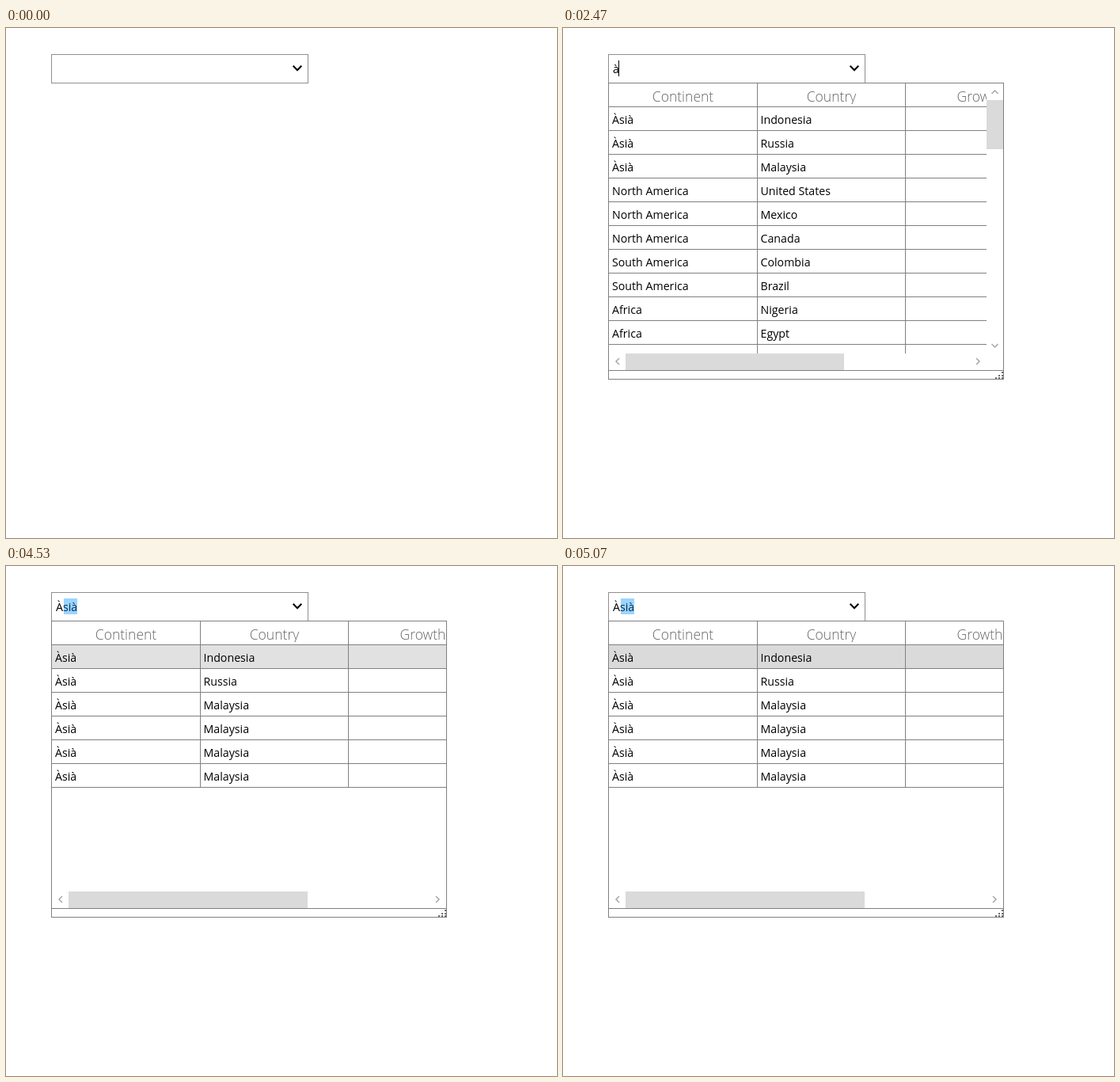
These frames come from a looping animation (696x644 px, 5140 ms). An HTML page:

```html
<!DOCTYPE html>
<html lang="en">
<head>
<meta charset="utf-8">
<style>
  html, body { margin: 0; width: 100%; height: 100%; overflow: hidden; background: #fff; }
  svg { display: block; }
  text { font: 14.2px "Open Sans", "Noto Sans", sans-serif; }
  .head { font-size: 17.5px; font-weight: 300; fill: #666; text-anchor: middle; }
  rect { shape-rendering: crispEdges; }
  path { fill: none; }
</style>
</head>
<body>
<svg id="stage" width="696" height="644" viewBox="0 0 696 644"></svg>
<script>
const LOOP = 5140, OPEN = 2470, FILTER = 3000;
const LINE = '#808080', THUMB = '#dadada', HOVER = '#e2e1e1';
const ALL = [
  ['Àsià', 'Indonesia'], ['Àsià', 'Russia'], ['Àsià', 'Malaysia'],
  ['North America', 'United States'], ['North America', 'Mexico'], ['North America', 'Canada'],
  ['South America', 'Colombia'], ['South America', 'Brazil'],
  ['Africa', 'Nigeria'], ['Africa', 'Egypt'], ['Europe', 'Germany']
];
const ASIA = ['Indonesia', 'Russia', ...Array(4).fill('Malaysia')].map(name => ['Àsià', name]);

const rect = (x, y, w, h, fill, id = '') =>
  `<rect ${id && `id="${id}"`} x="${x}" y="${y}" width="${w}" height="${h}" fill="${fill}"/>`;
const text = (x, y, s, cls = '') => `<text x="${x}" y="${y}" class="${cls}">${s}</text>`;
const path = (d, color, width) => `<path d="${d}" stroke="${color}" stroke-width="${width}"/>`;
const box = (x, y, w, h, color) =>
  rect(x, y, w, h, color) + rect(x + 1, y + 1, w - 2, h - 2, '#fff');
const clip = (id, w, h) => `<clipPath id="${id}"><rect x="58" y="70" width="${w}" height="${h}"/></clipPath>`;

// Scrollbar arrow pointing along (dx, dy)
function arrow(x, y, dx, dy) {
  const bx = x - 2 * dx, by = y - 2 * dy;
  return path(`M${bx - 4 * dy} ${by - 4 * dx}L${x + 2 * dx} ${y + 2 * dy}L${bx + 4 * dy} ${by + 4 * dx}`, '#a6a6a6', 1.5);
}

function grip() {
  let dots = '';
  for (let r = 0; r < 3; r++)
    for (let c = 0; c <= r; c++) dots += rect(554 - 4 * c, 434 + 4 * r - (r > 1), 2, 2, '#6e6e6e');
  return dots;
}

function popup(id, rows, right, thumbWidth, marks = '') {
  const bottom = Math.min(411, 100 + rows.length * 30);
  const heads = ['Continent', 'Country', 'Growth']
    .map((s, i) => text(151.5 + 187.5 * i, 93, s, 'head')).join('');
  const body = rows.map(([a, b], i) => {
    const y = 100 + 30 * i;
    return text(62, y + 21, a) + text(249.5, y + 21, b) + rect(58, y + 29, 500, 1, LINE);
  }).join('');
  return `<g id="${id}">${clip(id + 'Head', right - 58, 26)}${clip(id + 'Body', right - 58, 341)}
    ${box(57, 69, 500, 375, LINE)}
    <g clip-path="url(#${id}Head)">${heads}</g>
    <g clip-path="url(#${id}Body)">${marks}${body}
      ${rect(58, 99, 500, 1, LINE)}${rect(245, 70, 1, bottom - 70, LINE)}${rect(432, 70, 1, bottom - 70, LINE)}</g>
    ${rect(79, 411, thumbWidth, 21, THUMB)}${arrow(69, 421, -1, 0)}${arrow(right - 11, 421, 1, 0)}
    ${rect(58, 432, 498, 1, LINE)}${grip()}</g>`;
}

const marks = rect(58, 100, 498, 29, THUMB, 'selected') + rect(58, 100, 498, 29, HOVER, 'hover');
const sideBar = rect(535, 91, 21, 62, THUMB) + arrow(545.5, 81, 0, -1) + arrow(545.5, 401, 0, 1);

document.getElementById('stage').innerHTML =
  box(57, 33, 325, 37, '#8f8f8f') +
  path('M362.7 47.8L368 53.2L373.3 47.8', '#000', 2) +
  rect(62, 41, 1, 20, '#000', 'caret') +
  `<g id="full">${popup('fullList', ALL, 535, 276)}${sideBar}${text(63, 57, 'à')}</g>
   <g id="filtered">${popup('asiaList', ASIA, 556, 302, marks)}${rect(73, 41, 17, 20, '#99d5ff')}
   <text x="63" y="57">À<tspan fill="#0b2a55">sià</tspan></text></g>`;

const $ = id => document.getElementById(id);
const show = (id, on) => $(id).setAttribute('display', on ? 'inline' : 'none');

function hoveredRow(t) {
  if (t < 3530 || t >= 4930) return -1;
  return t < 4600 ? 0 : t < 4730 ? 1 : 2;
}

function draw(t) {
  show('caret', t >= 1130 && t < 1730 || t >= 2200 && t < FILTER);
  $('caret').setAttribute('x', t < OPEN ? 62 : 70);
  show('full', t >= OPEN && t < FILTER);
  show('filtered', t >= FILTER);
  const row = hoveredRow(t);
  show('hover', row >= 0);
  $('hover').setAttribute('y', 100 + 30 * Math.max(row, 0));
}

const start = performance.now();
function tick() {
  draw((performance.now() - start) % LOOP);
  requestAnimationFrame(tick);
}
tick();
</script>
</body>
</html>
```
